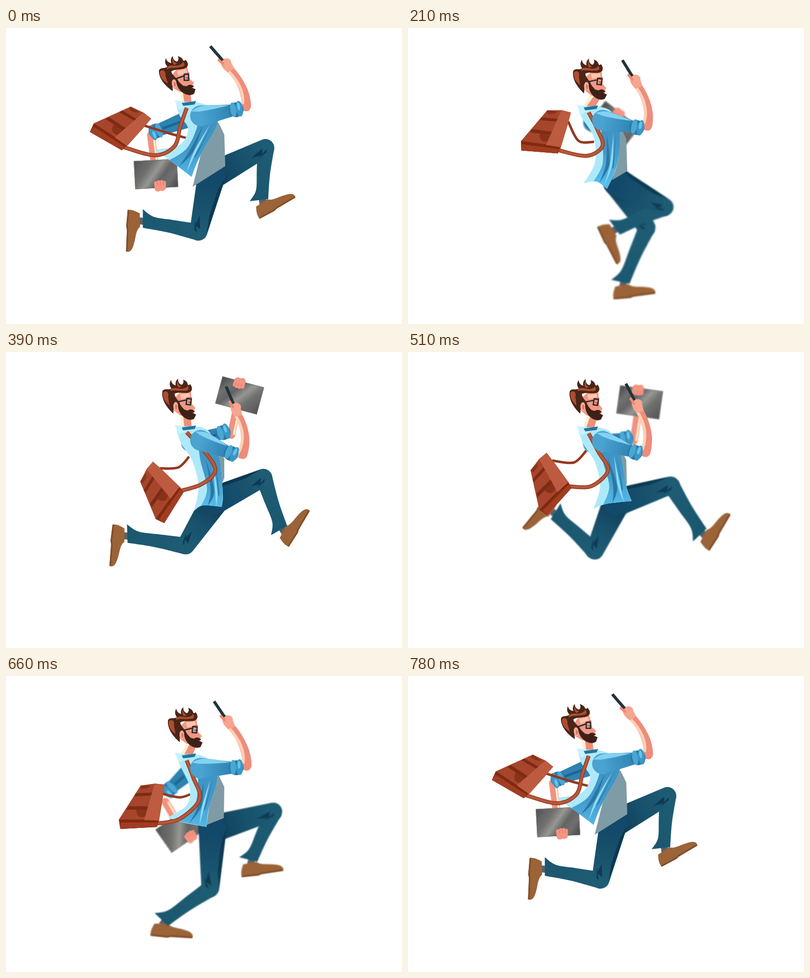
These frames come from a looping animation (800 by 600 pixels, 0.81 s). An HTML page with a canvas:

```html
<!DOCTYPE html>
<html lang="en">
<head>
<meta charset="utf-8">
<title>Running man</title>
<style>
html, body { margin: 0; width: 100%; height: 100%; overflow: hidden; background: #fff; }
canvas { display: block; width: 800px; height: 600px; }
</style>
</head>
<body>
<canvas id="stage" width="800" height="600"></canvas>
<script>
const ctx = document.getElementById('stage').getContext('2d');
const LOOP = 810, CYCLE = 780, STEP = 30;
const TIMES = [0, 120, 270, 390, 510, 660];

// One row per key time
const body = [ // drop, hip x y, head x y turn
  [0, 415, 300, 375, 125, 0], [9, 418, 310, 390, 134, 5], [9, 424, 312, 394, 135, 9],
  [1, 423, 300, 376, 127, 8], [3, 421, 305, 386, 128, 9], [9, 417, 310, 389, 135, 6]];
const farLeg = [ // thigh angle and length, calf angle and length, foot angle
  [-27.6, 123, 94, 109, -28], [-17.3, 128, 68, 118, -62], [106, 100, 152, 127, 45],
  [123, 110, 189, 123, 97], [114, 107, 222.5, 115, 132], [-16, 128, 114.6, 112, -6]];
const nearLeg = [
  [103, 116, 190.7, 118, 95], [95, 115, 213.5, 114, 126], [-13.6, 106, 106.5, 111, 10],
  [-25, 107, 70.6, 114, -57], [-17.6, 115, 57, 119, -57], [92, 120, 144.5, 120, 6]];
const nearArm = [ // cuff, elbow, phone end, phone angle
  [463, 166, 486, 160, 437, 65, 49], [463, 185, 487, 183, 441, 81, 56],
  [458, 207, 482, 206, 458, 103, 60], [453, 205, 479, 208, 459, 104, 67],
  [457, 203, 481, 204, 457, 97, 63], [463, 186, 487, 183, 441, 82, 56]];
const farArm = [ // cuff, elbow, laptop centre, laptop angle
  [305, 208, 293, 217, 303, 296, -3], [318, 232, 311, 246, 357, 296, -43],
  [443, 192, 457, 190, 449, 120, -182], [437, 164, 455, 168, 472, 88, -165],
  [438, 176, 456, 180, 468, 102, -172], [332, 228, 322, 255, 354, 310, -35]];
const bagKeys = [ // centre, angle, back strap middle and end
  [231, 197, 33, 328, 213, 364, 223], [236, 178, 38, 325, 222, 372, 225],
  [303, 240, -20, 355, 232, 377, 233], [308, 285, -55, 348, 234, 370, 212],
  [280, 268, -45, 335, 224, 360, 200], [275, 265, 0, 350, 246, 372, 240]];
const strap = [ // bends of the front strap
  [300, 258, 340, 240, 352, 200], [297, 252, 332, 238, 350, 200],
  [395, 265, 426, 240, 400, 208], [395, 268, 423, 240, 400, 200],
  [370, 272, 404, 240, 385, 203], [350, 290, 391, 250, 378, 205]];
const shirt = [ // back x3, tail, hem, hem tip, belly, chest
  [350, 176, 368, 205, 350, 237, 300, 247, 340, 275, 375, 302, 393, 258, 428, 190],
  [350, 180, 370, 215, 365, 255, 328, 290, 358, 298, 388, 320, 410, 270, 427, 205],
  [352, 182, 378, 225, 384, 280, 370, 322, 393, 315, 413, 327, 430, 280, 429, 210],
  [353, 184, 376, 220, 389, 272, 380, 322, 398, 311, 436, 314, 438, 285, 430, 210],
  [354, 186, 377, 222, 388, 272, 375, 318, 400, 308, 452, 302, 441, 272, 429, 205],
  [352, 182, 371, 225, 365, 262, 327, 287, 358, 297, 405, 306, 411, 265, 427, 205]];
const vest = [[443, 280, 377, 322], [443, 291, 392, 320], [443, 286, 424, 298],
  [441, 255, 432, 278], [442, 268, 430, 280], [440, 288, 400, 304]];

// Cyclic cubic interpolation with limited slopes
function at(rows, t) {
  const n = TIMES.length, time = i => TIMES[(i + n) % n] + CYCLE * Math.floor(i / n);
  t %= CYCLE;
  let i = n - 1;
  while (TIMES[i] > t) i--;
  const span = time(i + 1) - time(i), u = (t - time(i)) / span;
  return rows[0].map((_, k) => {
    const v = j => rows[(j + n) % n][k];
    const sec = j => (v(j + 1) - v(j)) / (time(j + 1) - time(j));
    const slope = j => {
      const a = sec(j - 1), b = sec(j);
      if (a * b <= 0) return 0;
      return Math.sign(a) * Math.min(Math.abs(a + b) / 2, 3 * Math.abs(a), 3 * Math.abs(b));
    };
    const w = 1 - u;
    return v(i) * w * w * (1 + 2 * u) + v(i + 1) * u * u * (3 - 2 * u)
      + span * (slope(i) * u * w * w - slope(i + 1) * u * u * w);
  });
}

const rad = d => d * Math.PI / 180;
const polar = (p, deg, len) => [p[0] + Math.cos(rad(deg)) * len, p[1] + Math.sin(rad(deg)) * len];
const mix = (a, b, k) => [a[0] + (b[0] - a[0]) * k, a[1] + (b[1] - a[1]) * k];
const pairs = a => a.reduce((r, v, i) => (i % 2 ? r[r.length - 1].push(v) : r.push([v]), r), []);

function fill(color, d) { ctx.fillStyle = color; ctx.fill(new Path2D(d)); }

function poly(color, pts) {
  ctx.beginPath();
  pts.forEach(p => ctx.lineTo(...p));
  ctx.closePath();
  ctx.fillStyle = color;
  ctx.fill();
}

// Smooth run through points; its first point joins the current path
function run(pts) {
  ctx.lineTo(...pts[0]);
  for (let i = 0; i < pts.length - 1; i++) {
    const a = pts[i - 1] || pts[i], b = pts[i], c = pts[i + 1], d = pts[i + 2] || c;
    ctx.bezierCurveTo(b[0] + (c[0] - a[0]) / 6, b[1] + (c[1] - a[1]) / 6,
      c[0] - (d[0] - b[0]) / 6, c[1] - (d[1] - b[1]) / 6, c[0], c[1]);
  }
}

function line(color, width, pts, cap = 'butt') {
  ctx.beginPath();
  run(pts);
  ctx.strokeStyle = color;
  ctx.lineWidth = width;
  ctx.lineCap = cap;
  ctx.stroke();
}

function ellipse(color, x, y, rx, ry, turn = 0) {
  ctx.beginPath();
  ctx.ellipse(x, y, rx, ry, turn, 0, 7);
  ctx.fillStyle = color;
  ctx.fill();
}

function capsule(color, a, ra, b, rb) {
  const dir = Math.atan2(b[1] - a[1], b[0] - a[0]);
  const off = Math.acos(Math.max(-1, Math.min(1, (ra - rb) / Math.hypot(b[0] - a[0], b[1] - a[1]))));
  ctx.beginPath();
  ctx.arc(...a, ra, dir + off, dir - off + 2 * Math.PI);
  ctx.arc(...b, rb, dir - off, dir + off);
  ctx.closePath();
  ctx.fillStyle = color;
  ctx.fill();
}

function shade(a, b, ...colors) {
  const g = ctx.createLinearGradient(...a, ...b);
  colors.forEach((c, i) => g.addColorStop(i / (colors.length - 1), c));
  return g;
}

function placed(x, y, deg, draw) {
  ctx.save();
  ctx.translate(x, y);
  ctx.rotate(rad(deg));
  draw();
  ctx.restore();
}

function drawLeg(hip, [thigh, thighLen, calf, calfLen, foot], near) {
  const knee = polar(hip, thigh, thighLen), ankle = polar(knee, calf, calfLen);
  const top = near ? '#12486a' : '#0f3c57', low = '#1e5c74';
  const side = (along, out) => polar(polar(knee, calf, along), calf + 90, out);

  line('#5a606c', 14, [side(calfLen - 14, 1), polar(ankle, foot + 90, 6)]);
  placed(...ankle, foot, () => {
    fill('#9b6337', 'M-15 4L12 1C20 10 36 7 50 11C61 13 67 18 64 25L20 27L14 29L-20 29C-22 18-18 12-15 4Z');
    fill('#7e4c28', 'M64 22L20 24L14 26L-20 26V29H14L20 27L64 25Z');
  });

  ctx.beginPath();
  run([side(-2, 16), side(calfLen * .45, 14), side(calfLen * .8, 13), side(calfLen + 1, 24)]);
  run([side(calfLen - 6, -13), side(calfLen * .5, -13), side(0, -18)]);
  ctx.closePath();
  ctx.fillStyle = shade(knee, ankle, low, '#1b5870');
  ctx.fill();
  capsule(shade(hip, knee, top, '#17506b', low), hip, 28, knee, 18);

  const on = (k, out) => polar(mix(hip, knee, k), thigh - 90, out);
  if (near) {
    ctx.beginPath();
    run([on(0, 28), on(.45, 23), on(1, 17)]);
    run([on(.7, 14), on(.2, 20), on(0, 28)]);
    ctx.fillStyle = '#0d3850';
    ctx.fill();
  }
  poly('#0e3b54', [on(.72, -5), on(.95, 2), on(.9, -10)]);
  poly('#0e3b54', [on(.8, -13), on(1.02, -3), on(.98, -9)]);
}

function drawCuff(p, dir) {
  placed(...p, dir, () => {
    ellipse('#2479a6', 2, 0, 15, 15);
    ellipse('#4ba6d3', -4, -1, 6, 15);
    ellipse('#3c97c6', 9, -1, 7, 16);
    ellipse('#66c4ea', 8, -6, 3, 8);
  });
}

const angle = (a, b) => Math.atan2(b[1] - a[1], b[0] - a[0]) * 180 / Math.PI;

function drawFarArm([cx, cy, ex, ey, lx, ly, turn], drop) {
  const shoulder = [372, 183 + drop], cuff = [cx, cy], elbow = [ex, ey];
  line('#f2917f', 16, [elbow, [lx, ly]], 'round');
  line('#fff0cd', 4, [[ex + 5, ey], [lx + 5, ly]]);
  capsule('#2e82b0', shoulder, 18, cuff, 12);
  line('#1b6590', 5, [mix(shoulder, cuff, .3), mix(shoulder, cuff, .85)]);
  drawCuff(cuff, angle(shoulder, cuff));
  placed(lx, ly, turn, () => {
    ctx.fillStyle = shade([-40, -34], [38, 26], '#505050', '#626262', '#70706e', '#969692', '#646464', '#707070', '#505050');
    ctx.fillRect(-43.5, -28.5, 87, 57);
    ctx.strokeStyle = '#747878';
    ctx.lineWidth = 1;
    ctx.strokeRect(-43, -28, 86, 56);
    fill('#f59582', 'M-5 18Q-3 13 1 15Q4 11 8 14Q12 11 14 15Q20 13 19 20L18 31Q13 37 7 34Q0 38-4 32Z');
    line('#dc7669', 1, [[2, 17], [2, 23]]);
    line('#dc7669', 1, [[8, 16], [8, 23]]);
    line('#dc7669', 1, [[14, 17], [14, 23]]);
  });
}

function drawNearArm([cx, cy, ex, ey, px, py, turn], drop) {
  const shoulder = [393, 178 + drop], cuff = [cx, cy], end = [px, py];
  const wrist = polar(end, turn, 22);
  const bend = [(ex + wrist[0]) / 2 + 19, (ey + wrist[1]) / 2];
  ctx.beginPath();
  ctx.moveTo(ex - 10, ey + 6);
  ctx.quadraticCurveTo(bend[0] - 8, bend[1], wrist[0] - 7, wrist[1] + 4);
  ctx.lineTo(wrist[0] + 6, wrist[1] - 4);
  ctx.quadraticCurveTo(bend[0] + 8, bend[1], ex + 9, ey);
  ctx.quadraticCurveTo(ex + 5, ey + 14, ex - 10, ey + 6);
  ctx.fillStyle = '#ed8d7c';
  ctx.fill();
  ctx.beginPath();
  ctx.moveTo(ex - 8, ey - 6);
  ctx.quadraticCurveTo(bend[0] - 5, bend[1], wrist[0] - 4, wrist[1] + 4);
  ctx.strokeStyle = '#ffd0b4';
  ctx.lineWidth = 6;
  ctx.stroke();
  placed(px, py, turn, () => {
    fill('#f6a58f', 'M-8 3Q0-2 3-9Q10-15 16-10L29-7L26 8Q12 12 3 7L-6 8Z');
    ctx.fillStyle = '#20343a';
    ctx.fillRect(-37, -3, 38, 6);
    fill('#ee8776', 'M-7 3L7 1L10 5L-5 8Z');
  });
  capsule(shade(shoulder, cuff, '#4aa3d1', '#2c80ad'), shoulder, 21, cuff, 11);
  const dir = angle(shoulder, cuff), on = (k, out) => polar(mix(shoulder, cuff, k), dir - 90, out);
  ctx.beginPath();
  run([on(-.25, 12), on(.05, 19), on(.5, 16), on(.85, 11)]);
  run([on(.4, 9), on(0, 9), on(-.25, 12)]);
  ctx.fillStyle = '#83d2f1';
  ctx.fill();
  drawCuff(cuff, dir);
}

function drawShirt(pts, vestPts, drop) {
  const [b1, b2, b3, tail, hem, tip, belly, chest] = pts;
  const collar = [343, 149 + drop], front = [384, 150 + drop], chin = [410, 160 + drop];
  poly('#7f9ba5', [[418, 190 + drop], [430, 193 + drop], [441, 216 + drop], ...vestPts, belly]);

  ctx.beginPath();
  run([collar, b1, b2, b3, tail]);
  run([tail, hem, tip]);
  run([tip, belly, chest, chin, front]);
  ctx.closePath();
  ctx.fillStyle = '#aee9fa';
  ctx.fill();
  ctx.save();
  ctx.clip();

  ctx.beginPath();
  run([[388, 168 + drop], mix(b2, chest, .3), mix(b3, belly, .35), mix(tail, hem, .75)]);
  run([tip, belly, [chest[0] + 12, chest[1]], [400, 165 + drop]]);
  ctx.closePath();
  ctx.fillStyle = shade([390, 180], [390, 315], '#3c93c2', '#4298c8', '#56bdec');
  ctx.fill();
  const fold = (color, a, b, c) => {
    ctx.beginPath();
    run([a, b, c]);
    run([c, mix(b, belly, .3), a]);
    ctx.fillStyle = color;
    ctx.fill();
  };
  fold('#2a77a4', mix(b2, chest, .5), mix(b3, belly, .5), mix(hem, tip, .25));
  fold('#8edcf8', mix(b2, chest, .75), mix(b3, belly, .68), mix(hem, tip, .7));
  fold('#2d80ae', mix(b2, chest, .85), mix(b3, belly, .8), mix(hem, belly, .75));
  ctx.restore();

  poly('#c4f3ff', [[341, 147 + drop], [360, 149 + drop], [366, 158 + drop], [350, 166 + drop]]);
  poly('#21759d', [[355, 152 + drop], [384, 148 + drop], [381, 155 + drop], [358, 158 + drop]]);
}

function drawHead(x, y, turn, drop) {
  const base = [365, 153 + drop], top = [x - 13, y + 1];
  line('#ee8e7b', 20, [top, base]);
  line('#fff0cd', 6, [[top[0] - 8, top[1] + 1], [base[0] - 8, base[1] - 3]]);
  placed(x, y, turn, () => {
    ctx.translate(-375, -125);
    fill('#f29783', 'M335 96L345 83L366 79L369 92L372 104L380 111L377 116L379 121L372 130H352L338 122Z');
    fill('#ffc6ad', 'M345 87L363 83L366 90L349 97Z');
    fill('#4a2518', 'M337 128C322 118 308 102 309 86C312 79 322 83 326 78C320 72 321 66 323 61C325 69 330 70 334 71C332 66 333 60 337 57C337 64 342 68 346 68C349 65 349 61 347 57C354 59 357 62 358 66C361 67 362 66 362 64C369 70 370 79 361 82C352 85 340 83 334 88C335 95 342 98 346 105L345 114L336 108Z');
    fill('#ad4e2f', 'M311 88C318 82 323 88 322 96L327 113C316 106 310 98 311 88ZM325 80C333 72 340 79 350 75C356 73 358 70 357 68C364 74 360 79 352 79C342 82 332 79 325 84Z');
    fill('#ad4e2f', 'M337 60C337 68 342 71 346 72L340 75C336 71 335 66 337 60Z');
    ellipse('#f8ab95', 340, 113, 5, 9, -.15);
    ellipse('#dc7668', 341, 114, 2, 5, -.15);
    fill('#3d2118', 'M346 103C348 109 352 112 358 117L365 118C370 113 376 115 380 118L375 121L383 124L380 133C374 138 364 136 357 131C350 126 345 118 344 109Z');
    fill('#c4574f', 'M360 92L370 90V93L361 95ZM362 100L369 99L367 104Z');
    line('#20272c', 2.5, [[343, 103], [360, 97]]);
    ctx.strokeRect(360, 94, 9, 12);
  });
}

function drawBag([x, y, turn]) {
  placed(x, y, turn, () => {
    fill('#a6452b', 'M-3-43L26-47L45-45L42-20L34 30L30 41L-44 45L-47 26Z');
    fill('#82290f', 'M-47 26L33 26L30 41L-44 45Z');
    fill('#a03d22', 'M-44 32L31 32L30 41L-44 45Z');
    fill('#7d2b14', 'M-13-27L24-29L23-23L-16-21ZM-28-1L17-1L15 6L-32 6Z');
    fill('#8a3219', 'M-12 6H12Q10 22-2 21Q-11 20-12 6ZM-3-43H18Q10-34-3-37Z');
    fill('#bc5b40', 'M25-46L45-45L34 28L4 27Z');
  });
}

function inBag([x, y, turn], px, py) {
  return polar(polar([x, y], turn, px), turn + 90, py);
}

function draw(t) {
  const [drop, hx, hy, headX, headY, turn] = at(body, t);
  const bag = at(bagKeys, t), hip = [hx, hy];
  const blur = 1.5 * Math.sin(Math.PI * t / 390) ** 2;
  ctx.clearRect(0, 0, 800, 600);

  ctx.filter = blur > .1 ? `blur(${blur.toFixed(2)}px)` : 'none';
  drawFarArm(at(farArm, t), drop);
  drawLeg(hip, at(farLeg, t), false);
  drawLeg(hip, at(nearLeg, t), true);
  ctx.filter = 'none';

  line('#93391f', 5, [inBag(bag, 42, -26), [bag[3], bag[4]], [bag[5], bag[6]]]);
  drawHead(headX, headY, turn, drop);
  drawShirt(pairs(at(shirt, t)), pairs(at(vest, t)), drop);
  const bends = [inBag(bag, 28, 34), ...pairs(at(strap, t)), [365, 162 + drop]];
  line('#8f3a20', 8, bends);
  line('#b9573a', 5, bends);
  drawBag(bag);
  drawNearArm(at(nearArm, t), drop);
}

const start = performance.now();
let shown = -1;
function tick() {
  const t = Math.floor((performance.now() - start) % LOOP / STEP) * STEP;
  if (t !== shown) draw(shown = t);
  requestAnimationFrame(tick);
}
tick();
</script>
</body>
</html>
```
